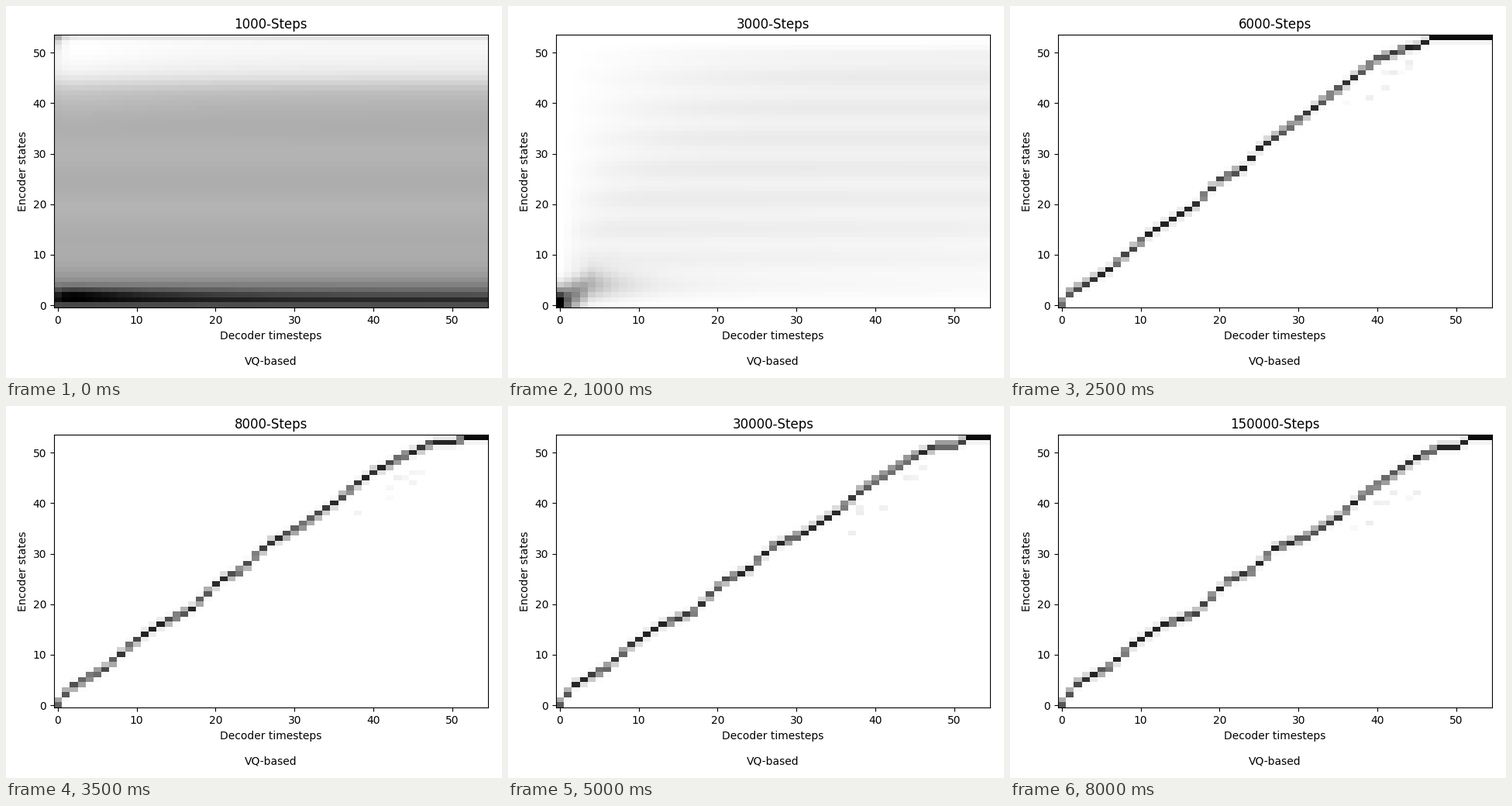
A matplotlib script that plays this animation: 640 px wide and 480 px high, repeating every 8500 ms.

```python
import numpy as np
import matplotlib.pyplot as plt
from matplotlib.animation import FuncAnimation

W, H, DPI = 640, 480, 100
COLS, ROWS = 55, 54
STEPS = [1000 * k for k in range(1, 11)] + [10000 + 20000 * k for k in range(1, 8)]
FIRST_ALIGNED = 5

col = np.arange(COLS)[None, :]
row = np.arange(ROWS)[:, None]

# Bends of the alignment path (decoder step, encoder state).
EARLY = [(0, .4), (1, 2.3), (6, 7), (11, 14), (15, 18), (17, 19.9), (20, 24.8),
         (23, 27), (25, 31), (29, 35.4), (33, 40.3), (40, 48.7), (44, 51),
         (45, 51.1), (47, 53)]
LATE = [(0, .3), (2, 4.25), (4, 6), (6, 7.45), (9, 12), (13, 16), (15, 17),
        (17, 18.15), (21, 24.6), (24, 26.45), (27, 31), (29, 32), (31, 33.2),
        (35, 37), (38, 41.3), (40, 43.4), (45, 48.9), (48, 51), (50, 51), (52, 53)]


def path(knots):
    return np.interp(col[0], *zip(*knots))


def sigmoid(x):
    return 1 / (1 + np.exp(-x))


def bell(x):
    return np.exp(-x ** 2)


def band(centre, width):
    """Triangular attention around the path, with a slight vertical bleed."""
    w = np.clip(1 - np.abs(row - centre) / width, 0, None)
    w /= w.sum(axis=0)
    bleed = np.where(centre < ROWS - 1, .03, 0)
    out = w * (1 - 2 * bleed)
    out[1:] += w[:-1] * bleed
    out[:-1] += w[1:] * bleed
    return out


def stray(centre, i):
    """A few faint cells just below the upper part of the path."""
    rng = np.random.default_rng(i)
    out = np.zeros((ROWS, COLS))
    for c in rng.integers(36, 47, 8):
        out[int(centre[c]) - rng.integers(3, 7), c] = rng.uniform(.02, .07)
    return out


def aligned(i):
    """The path eases from its early to its late shape."""
    t = 1 - np.exp(-(i - FIRST_ALIGNED) / 3)
    centre = path(EARLY) + t * (path(LATE) - path(EARLY))
    return np.maximum(band(centre, 1.05), stray(centre, i))


def untrained():
    """Horizontal stripes with a transient in the first columns."""
    grey = 176 + 3 * np.cos(2 * np.pi * (row - 30) / 11)
    grey = grey - 136 * np.exp(-np.abs(row - .9) / 2.8)
    grey = grey + 68 * sigmoid((row - 44) / 1.2) - 20 * np.exp(-2 * (ROWS - 1 - row))
    onset = np.exp(-col / 13) * (1 - .5 * np.exp(-col))
    grey = grey + onset * (12 * sigmoid((row - 38) / 2) - 95 * bell((row - 2) / 1.3))
    grey = grey - 55 * np.exp(-col / .8 - (ROWS - 1 - row) / 1.8)
    return 1 - np.clip(grey, 0, 255) / 255


def diffuse():
    """Pale stripes that fade in to the right, and a dark blob at the origin."""
    stripes = 18 + 4 * np.cos(2 * np.pi * (row - 45) / 6)
    stripes = stripes * sigmoid((50.5 - row) / .7) * (1 - np.exp(-row / 6))
    fade_in = 1 - np.exp(-(col / (1 + (row / 11) ** 1.9)) ** 1.3)
    fade_out = 1 - .4 * col / COLS * bell(row / 20)
    amp = 190 * np.exp(-col / 3.5) + 90 * bell(col / .6) + 10 * np.exp(-col / 15)
    blob = amp * bell((row - np.minimum(4, col)) / 3)
    return np.clip(stripes * fade_in * fade_out + blob, 0, 255) / 255


def emerging(width, haze):
    """A broad band over what is left of the diffuse state."""
    w = band(path(EARLY), width)
    return np.maximum(w / w.max(), haze * diffuse())


def attention(i):
    if i >= FIRST_ALIGNED:
        return aligned(i)
    return [untrained(), .4 * untrained() + .6 * diffuse(), diffuse(),
            emerging(6, .4), emerging(1.8, .1)][i]


fig = plt.figure(figsize=(W / DPI, H / DPI), dpi=DPI)
left, right, bottom, top = 61.75, 621.7, 389.35, 37.4
ax = fig.add_axes([left / W, 1 - bottom / H, (right - left) / W, (bottom - top) / H])
image = ax.imshow(attention(0), cmap="binary", vmin=0, vmax=1, aspect="auto",
                  origin="lower", interpolation="none")
ax.set_xlabel("Decoder timesteps\n\nVQ-based")
ax.set_ylabel("Encoder states")
title = ax.set_title("")


def update(i):
    image.set_data(attention(i))
    title.set_text(f"{STEPS[i]}-Steps")
    return image, title


anim = FuncAnimation(fig, update, frames=len(STEPS), interval=500, repeat=True)
plt.show()
```
